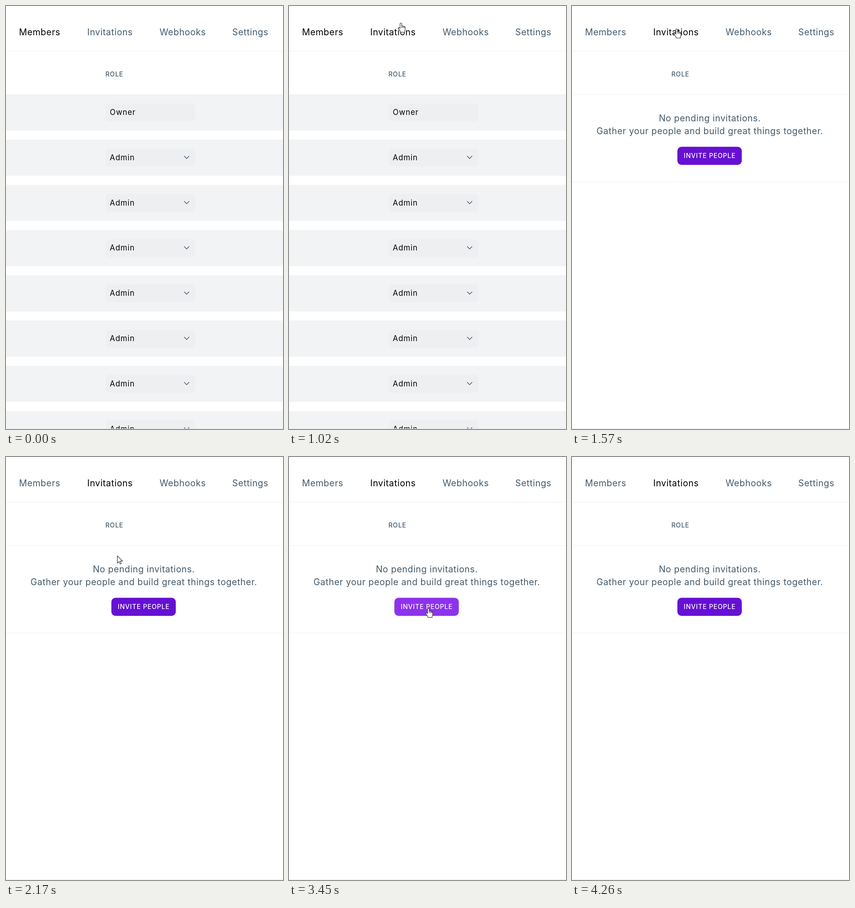
Animation of 606 by 924 pixels, one loop 5.27 s. Source, as an HTML page:

```html
<!DOCTYPE html>
<html lang="en">
<head>
<meta charset="utf-8">
<title>Team members</title>
<style>
  html, body { margin: 0; width: 100%; height: 100%; overflow: hidden; background: #fff; }
  svg { display: block; width: 606px; height: 924px; }
  text { font-family: Inter, "Open Sans", sans-serif; fill: #435a6b; }
  .tab, .note { font-size: 19.4px; letter-spacing: .55px; text-anchor: middle; }
  .caps { font-size: 14px; font-weight: 500; letter-spacing: .8px; }
  .value { font-size: 16.6px; letter-spacing: .95px; fill: #000; }
  .line { stroke: #f0f1f2; }
  .chevron { fill: none; stroke: #42597a; stroke-width: 1.4; stroke-linecap: round; stroke-linejoin: round; }
  .cursor { fill: #fff; stroke: #2b2b33; stroke-width: 1.1; stroke-linejoin: round; }
</style>
</head>
<body>
<svg viewBox="0 0 606 924">
  <rect width="606" height="924" fill="#fff"/>
  <g id="tabs"></g>
  <path class="line" d="M0 98.5H606"/>
  <text class="caps" x="217.5" y="153.5">ROLE</text>
  <g id="members"></g>
  <g id="invites">
    <path class="line" d="M0 193.5H605M0 384.5H605"/>
    <text class="note" x="301.5" y="251.5">No pending invitations.</text>
    <text class="note" x="301.5" y="280">Gather your people and build great things together.</text>
    <rect id="button" x="230.5" y="307.5" width="141" height="39.5" rx="9"/>
    <text class="caps" x="301.3" y="332.2" text-anchor="middle" style="fill:#fff">INVITE PEOPLE</text>
  </g>
  <path d="M0 923.5H606" stroke="#e6e7e9"/>
  <g id="hand" class="cursor">
    <path d="M-1.8 11.5V1.8a1.8 1.8 0 0 1 3.6 0V6.3q1.6-.9 2.9.6q1.6-.6 2.7.7q2-.2 2 2V13q0 2.5-1.3 4.5V20H-1.2V17.8L-5.5 12q-.8-1.8.8-2.2q1.4 0 2.9 1.7z"/>
    <path d="M1.8 6.5V10.5M4.7 7V10.8M7.4 7.8V11" fill="none"/>
  </g>
  <path id="arrow" class="cursor" d="M.5.5V16.5L4.2 13L6.6 18.4L9.2 17.3L6.8 12H11.8z"/>
  <circle id="click" cx="229" cy="50" r="11.7" fill="#fbfa7a" style="mix-blend-mode:multiply"/>
</svg>
<script>
const LOOP = 5270, SLATE = '#435a6b';
const $ = id => document.getElementById(id);
const show = (el, on) => el.setAttribute('visibility', on ? 'visible' : 'hidden');

const names = ['Members', 'Invitations', 'Webhooks', 'Settings'];
const centers = [73.6, 227.5, 386.6, 534.5];
$('tabs').innerHTML = names.map((n, i) =>
  `<text class="tab" x="${centers[i]}" y="63.5">${n}</text>`).join('');
const tabs = $('tabs').children;

const row = i => `<g transform="translate(0 ${(193 + i * 98.8).toFixed(1)})">
  <rect width="606" height="79" fill="#f2f3f5"/>
  <rect x="217.5" y="20" width="197" height="39" rx="8" fill="#eeeff1"/>
  <text class="value" x="227" y="45">${i ? 'Admin' : 'Owner'}</text>
  ${i ? '<path class="chevron" d="M390 36.2L395.2 41.4L400.4 36.2"/>' : ''}</g>`;
$('members').innerHTML = Array.from({ length: 8 }, (_, i) => row(i)).join('');

const mix = (a, b, k) => a + (b - a) * k;
const easeOut = (u, p) => 1 - (1 - u) ** p;
const smooth = u => u * u * (3 - 2 * u);

// Pointer moves: first step time, last step time, step count, position for u in (0, 1]
const moves = [
  [600, 1090, 8, (u, i) => [mix(574, 231, easeOut(i / 7, 1.65)), mix(0, 43.5, i / 7)]],
  [1160, 1300, 3, u => [mix(231, 229, u), mix(43.5, 50, u)]],
  [1900, 2370, 8, u => [mix(229, 265, u * u), mix(50, 292, smooth(u))]],
  [2440, 2510, 2, u => [mix(265, 281, u), mix(292, 311, u)]],
  [2580, 2790, 4, u => [mix(281, 304, easeOut(u, 2)), mix(311, 329.5, easeOut(u, 2))]],
  [3450, 3450, 1, () => [305, 330.5]],
  [3910, 4190, 5, u => [mix(305, 525, u ** 1.4), 330.5]]
];

function pointer(t) {
  if (t < 600 || t >= 4260) return null;
  const [start, end, n, path] = moves.filter(m => t >= m[0]).pop();
  const gap = (end - start) / (n - 1) || 1;
  const i = Math.min(n - 1, Math.floor((t - start) / gap + 1e-6));
  return path((i + 1) / n, i);
}

function draw(t) {
  const p = pointer(t), invites = t >= 1570;
  const [x, y] = p || [-50, -50];
  const onTab = p && x < 290 && y > 20 && y < 98;
  const onButton = p && invites && x > 230 && x < 372 && y > 307 && y < 347;

  tabs[0].style.fill = invites ? SLATE : '#000';
  tabs[1].style.fill = invites || onTab ? '#000' : SLATE;
  show($('members'), !invites);
  show($('invites'), invites);
  $('button').setAttribute('fill', onButton ? '#8d33ec' : '#6610d4');

  show($('hand'), onTab || onButton);
  show($('arrow'), p && !onTab && !onButton);
  for (const id of ['hand', 'arrow'])
    $(id).setAttribute('transform', `translate(${x.toFixed(1)} ${y.toFixed(1)})`);
  show($('click'), t >= 1500 && t < 1570);
}

const t0 = performance.now();
function tick(now) {
  draw(Math.max(0, now - t0) % LOOP);
  requestAnimationFrame(tick);
}
draw(0);
requestAnimationFrame(tick);
</script>
</body>
</html>
```
